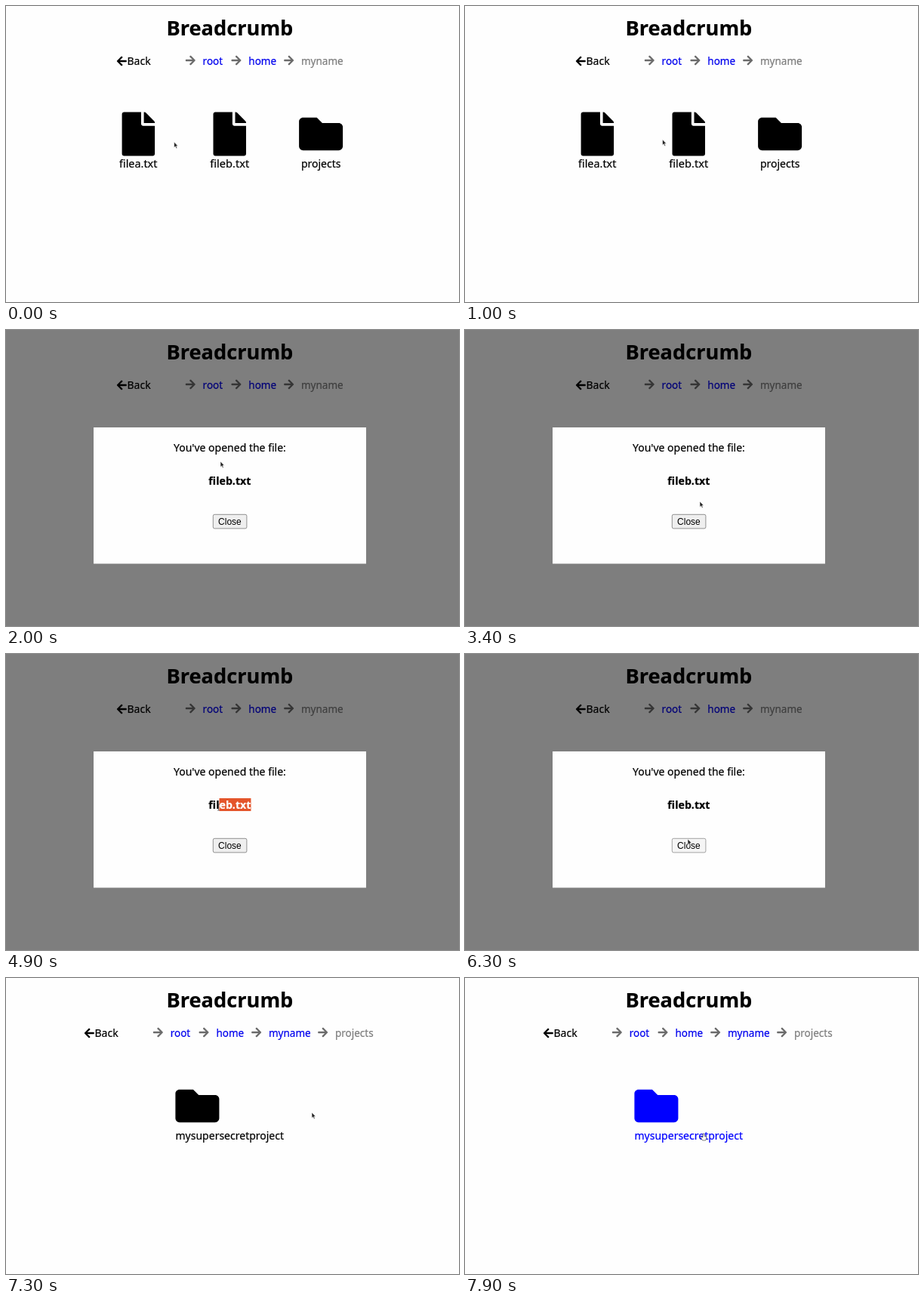
These frames come from a looping animation (600x392 px, 8000 ms). An HTML page:

```html
<!DOCTYPE html>
<html lang="en">
<head>
<meta charset="utf-8">
<title>Breadcrumb</title>
<style>
  html, body { margin: 0; width: 100%; height: 100%; overflow: hidden; background: #fefefe; }
  svg { display: block; font: 14px "Noto Sans", "Open Sans", sans-serif; color: #000; fill: currentColor; }
  text { fill: currentColor; stroke: currentColor; stroke-width: .2; }
  .mid { text-anchor: middle; }
  .bold { font-weight: bold; }
  .crumb { font-size: 13.5px; color: #00e; }
  .crumb.last { color: #7d7d7d; }
  .sep { color: #6b6b6b; fill: currentColor; }
  .hover { color: #00f; fill: currentColor; }
  .picked { color: #fff; }
  .button { font: 12px "Liberation Sans", Arial, sans-serif; stroke: none; }
  #close { fill: #efefef; stroke: #767676; }
  #close.over { fill: #e5e5e5; stroke: #4f4f4f; }
  #close.down { fill: #f5f5f5; stroke: #8d8d8d; }
  #cursor path { stroke-width: .6; stroke-linejoin: round; }
</style>
</head>
<body>
<svg width="600" height="392" viewBox="0 0 600 392">
  <defs>
    <path id="file" transform="scale(.1133)" d="M224 136V0H24C10.7 0 0 10.7 0 24v464c0 13.3 10.7 24 24 24h336c13.3 0 24-10.7 24-24V160H248c-13.2 0-24-10.8-24-24zm160-14.1v6.1H256V0h6.1c6.4 0 12.5 2.5 17 7l97.9 98c4.5 4.5 7 10.6 7 16.9z"/>
    <path id="folder" transform="scale(.1133)" d="M464 128H272l-64-64H48C21.5 64 0 85.5 0 112v288c0 26.5 21.5 48 48 48h416c26.5 0 48-21.5 48-48V176c0-26.5-21.5-48-48-48z"/>
    <path id="left" transform="scale(.029) translate(0 -256)" d="M257.5 445.1l-22.2 22.2c-9.4 9.4-24.6 9.4-33.9 0L7 273c-9.4-9.4-9.4-24.6 0-33.9L201.4 44.7c9.4-9.4 24.6-9.4 33.9 0l22.2 22.2c9.5 9.5 9.3 25-.4 34.3L136.6 216H424c13.3 0 24 10.7 24 24v32c0 13.3-10.7 24-24 24H136.6l120.5 114.8c9.8 9.3 10 24.8.4 34.3z"/>
    <clipPath id="clip"><rect class="selection" y="191" height="17"/></clipPath>
  </defs>
  <text class="mid bold" x="296.4" y="39" font-size="27.2">Breadcrumb</text>
  <g id="pages"></g>
  <g id="modal">
    <rect width="600" height="392" opacity=".5"/>
    <rect x="116" y="129" width="361" height="180.5" fill="#fefefe"/>
    <text class="mid" x="296.4" y="161">You've opened the file:</text>
    <text class="mid bold" id="name" x="296.4" y="205" font-size="14.2">fileb.txt</text>
    <rect class="selection" y="191" height="17" fill="#e4552b"/>
    <text class="mid bold picked" x="296.4" y="205" font-size="14.2" clip-path="url(#clip)">fileb.txt</text>
    <rect id="close" x="274.3" y="244.3" width="44.6" height="18.6" rx="2" stroke-width=".8"/>
    <text class="mid button" x="296.4" y="257.6">Close</text>
  </g>
  <g id="cursor">
    <path id="arrow" fill="#222" stroke="#fff" d="M0 0V7.4L1.7 5.9 3 8.7 4.2 8.1 3 5.5H5.2z"/>
    <path id="beam" fill="none" stroke="#333" d="M-1.5-4H1.5M0-4V4M-1.5 4H1.5"/>
    <path id="hand" fill="#fff" stroke="#222" d="M-1 5V.5Q0-.7 1 .5V3.2L3.7 4V6.5L2.8 9H-1.5L-3.6 5.6-2.8 4.8z"/>
  </g>
</svg>
<script>
const $ = id => document.getElementById(id);

const pages = [
  { back: 146.8, crumbs: [["root", 260.6], ["home", 321.3], ["myname", 391]],
    items: [
      { icon: "file", x: 153.6, name: "filea.txt", mid: 175.2, left: 150, right: 201, size: 14.4 },
      { icon: "file", x: 274.5, name: "fileb.txt", mid: 296.2, left: 270, right: 323, size: 14.6 },
      { icon: "folder", x: 388.1, name: "projects", mid: 417.2, left: 388, right: 447, size: 14 }] },
  { back: 103.8, crumbs: [["root", 217.7], ["home", 278.4], ["myname", 348], ["projects", 436]],
    items: [
      { icon: "folder", x: 224.4, name: "mysupersecretproject", mid: 296.3, left: 224, right: 369, size: 14 }] }
];

const crumb = ([name, x], i, all) => `
  <use class="sep" href="#left" transform="translate(${x - 9.8} 72) scale(-1 1)"/>
  <text class="crumb ${i === all.length - 1 ? "last" : ""}" x="${x}" y="78">${name}</text>`;

const item = ({ icon, x, name, mid, size }) => `
  <g class="item"><use href="#${icon}" x="${x}" y="140.5"/>
  <text class="mid" x="${mid}" y="214" font-size="${size}">${name}</text></g>`;

$("pages").innerHTML = pages.map(p => `<g>
  <use href="#left" x="${p.back}" y="73"/>
  <text x="${p.back + 13.7}" y="78">Back</text>
  ${p.crumbs.map(crumb).join("")}${p.items.map(item).join("")}</g>`).join("");

// Pointer path: time, x, y
const path = [
  [0, 222.6, 180], [200, 222.6, 180], [500, 231.5, 180.5], [600, 231.5, 180.5],
  [1300, 284, 174], [2600, 284, 174], [2800, 320, 173], [3000, 320, 173],
  [3400, 311, 227], [3700, 302, 260], [3800, 302, 260], [3900, 300, 258],
  [4000, 300, 258], [4400, 329, 202], [4900, 281.5, 203], [5300, 266, 204],
  [5700, 266, 204], [6200, 295, 245], [6400, 295, 245], [6600, 311, 235],
  [7000, 400, 182], [7100, 405, 178], [7500, 405, 178], [7900, 316, 206]
];

function pointerAt(t) {
  const i = path.findIndex(k => k[0] >= t);
  const b = path[i], a = path[Math.max(0, i - 1)];
  const k = b === a ? 0 : (t - a[0]) / (b[0] - a[0]);
  return [a[1] + (b[1] - a[1]) * k, a[2] + (b[2] - a[2]) * k];
}

const show = (el, on) => el.style.display = on ? "" : "none";
const inside = (x, y, l, t, r, b) => x >= l && x <= r && y >= t && y <= b;

// Selection runs from the character edge nearest the pointer to the end of the name
function select(x, on) {
  const name = $("name"), n = name.getNumberOfChars();
  const end = name.getEndPositionOfChar(n - 1).x;
  let start = end;
  for (let i = 0; on && i < n; i++) {
    const edge = name.getStartPositionOfChar(i).x;
    if (Math.abs(edge - x) < Math.abs(start - x)) start = edge;
  }
  document.querySelectorAll(".selection").forEach(r => {
    r.setAttribute("x", start);
    r.setAttribute("width", end - start);
  });
}

function draw(now) {
  const t = Math.floor(now % 8000 / 100) * 100;
  const [x, y] = pointerAt(t);
  const modal = t >= 2000 && t < 6400;
  const current = t >= 7300 ? 1 : 0;
  let hovering = false;

  pages.forEach((page, p) => {
    const group = $("pages").children[p];
    show(group, p === current);
    group.querySelectorAll(".item").forEach((el, i) => {
      const { left, right } = page.items[i];
      const over = p === current && !modal && inside(x, y, left, 140, right, 218);
      el.classList.toggle("hover", over);
      hovering ||= over;
    });
  });

  show($("modal"), modal);
  if (modal) {
    select(x, t >= 4500 && t < 5200);
    const over = inside(x, y, 274, 244, 319, 263);
    $("close").setAttribute("class", !over ? "" : t >= 6300 ? "down" : "over");
  }

  const beam = modal && inside(x, y, 268, 191, 325, 209) && t > 4000 && t < 5300;
  const hand = hovering && current === 1;
  show($("beam"), beam);
  show($("hand"), hand);
  show($("arrow"), !beam && !hand);
  $("cursor").setAttribute("transform", `translate(${x} ${y})`);
  requestAnimationFrame(draw);
}
requestAnimationFrame(draw);
</script>
</body>
</html>
```
